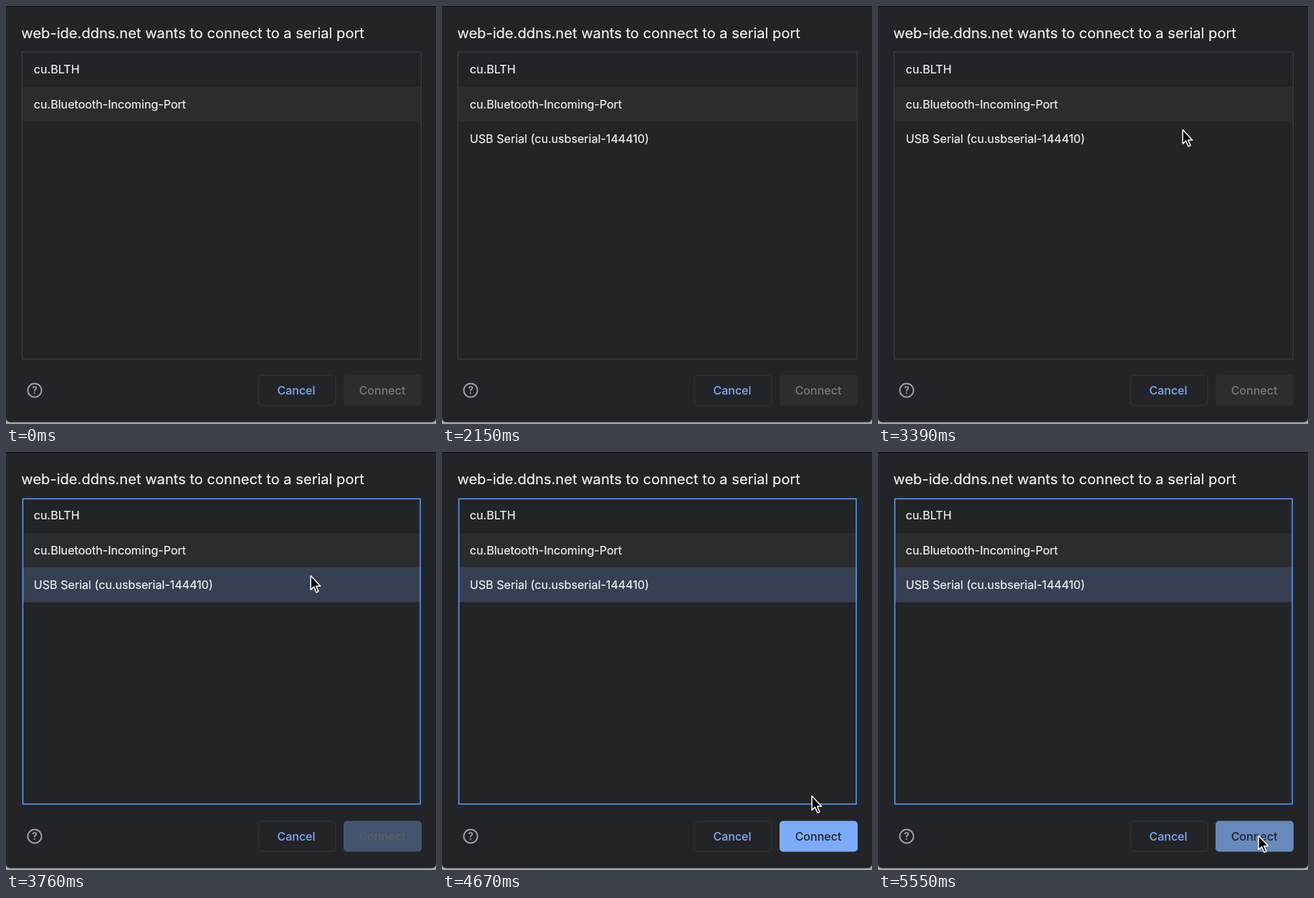
Animation of 600x583 px, one loop 5.58 s. Source, as an HTML page:

```html
<!DOCTYPE html>
<html lang="en">
<head>
<meta charset="utf-8">
<title>Serial port chooser</title>
<style>
  html, body { margin: 0; width: 100%; height: 100%; overflow: hidden; background: #232428; }
  svg { display: block; width: 600px; height: 583px; }
  text { font: 16.12px Inter, "Open Sans", sans-serif; fill: #eff0f2; stroke: #eff0f2; stroke-width: .2px; }
  .title { font-size: 20.12px; }
  .label { font-size: 16px; font-weight: 500; text-anchor: middle; stroke: none; }
</style>
</head>
<body>
<svg viewBox="0 0 600 583">
  <rect y="568" width="600" height="15" fill="#a6a6a8"/>
  <rect y="-20" width="600" height="600.5" rx="6" fill="#232428"/>
  <rect width="600" height="1" fill="#101113"/>

  <text class="title" x="21.3" y="44.5">web-ide.ddns.net wants to connect to a serial port</text>

  <rect x="23" y="113" width="556" height="48" fill="#2b2c2f"/>
  <rect id="row" x="23" y="161" width="556" height="48.5" fill="#364052"/>
  <rect id="frame" fill="none"/>
  <text x="38.8" y="94">cu.BLTH</text>
  <text x="38.8" y="142.5">cu.Bluetooth-Incoming-Port</text>
  <text id="usb" x="38.8" y="191">USB Serial (cu.usbserial-144410)</text>

  <circle cx="40" cy="536" r="9.6" fill="none" stroke="#9aa0a6" stroke-width="2"/>
  <text class="label" x="40" y="541" style="font-size:14px;font-weight:600;fill:#9aa0a6">?</text>

  <rect x="352" y="515" width="108" height="42" rx="4.5" fill="none" stroke="#34363a"/>
  <text class="label" x="405" y="541.5" style="fill:#7cacf8">Cancel</text>
  <rect id="button" x="471" y="514.5" width="109" height="43" rx="5"/>
  <text id="connect" class="label" x="525" y="541.5">Connect</text>

  <path id="cursor" d="M0 0V19.6L4.4 15.6L7.8 23.4L10.8 22.1L7.5 14.4H13.5Z"
        fill="#000" stroke="#fff" stroke-width="1.5" stroke-linejoin="round"/>
</svg>
<script>
const LOOP = 5580, PLUGGED = 850, ENTER = 2970, CLICK = 3700, PRESS = 5330;
const $ = id => document.getElementById(id);

// Pointer path: time, x, y
const path = [
  [2940, 604, 260], [2970, 592, 254.5], [3390, 425.2, 172.5], [3900, 425.2, 172.5],
  [4360, 485.2, 326.5], [4790, 523, 511], [5090, 530, 526], [5420, 531, 535]
];

const clamp = v => Math.max(0, Math.min(1, v));
const mix = (a, b, k) => `rgb(${a.map((v, i) => Math.round(v + (b[i] - v) * k))})`;

function speed(i, axis) {
  const rate = j => (path[j + 1][axis] - path[j][axis]) / (path[j + 1][0] - path[j][0]);
  if (i < 1 || i >= path.length - 1) return 0;
  const a = rate(i - 1), b = rate(i);
  return a * b > 0 ? 2 * a * b / (a + b) : 0;
}

// Monotone cubic curve through the path points
function at(t, axis) {
  let i = 0;
  while (i < path.length - 2 && t >= path[i + 1][0]) i++;
  const p = path[i], q = path[i + 1], d = q[0] - p[0], k = clamp((t - p[0]) / d);
  const s = k * k * (3 - 2 * k);
  return p[axis] + (q[axis] - p[axis]) * s
    + d * k * (1 - k) * ((1 - k) * speed(i, axis) - k * speed(i + 1, axis));
}

function set(id, attrs) {
  for (const name in attrs) $(id).setAttribute(name, attrs[name]);
}

function draw(t) {
  const chosen = t >= CLICK, on = clamp((t - CLICK) / 200), press = clamp((t - PRESS) / 200);
  const show = (id, yes) => set(id, { visibility: yes ? "visible" : "hidden" });
  show("usb", t >= PLUGGED);
  show("row", chosen);
  show("cursor", t >= ENTER);
  set("frame", chosen
    ? { x: 23.5, y: 65.3, width: 554.5, height: 425.7, stroke: "#5e95e8", "stroke-width": 1.6 }
    : { x: 22.3, y: 64, width: 557, height: 428.3, stroke: "#3b3d41", "stroke-width": 1.2 });
  set("button", {
    fill: press ? mix([124, 172, 248], [104, 137, 188], press) : mix([44, 45, 49], [124, 172, 248], on)
  });
  $("connect").style.fill = mix([120, 121, 124], [32, 34, 40], on);
  set("cursor", { transform: `translate(${at(t, 1)} ${at(t, 2)})` });
}

const start = performance.now();
function tick() {
  draw((performance.now() - start) % LOOP);
  requestAnimationFrame(tick);
}
tick();
</script>
</body>
</html>
```
